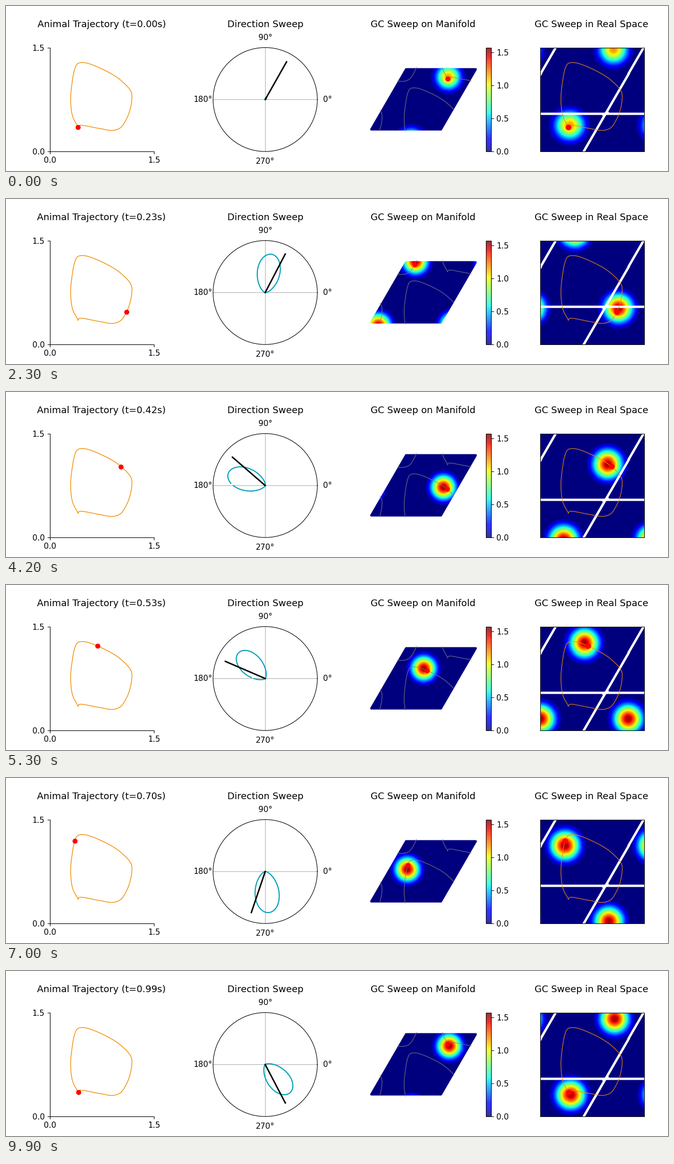
Recreate the animation shown at these times as a matplotlib script. Size 1280 px wide and 320 px high, loop 10000 ms.

```python
import numpy as np
import matplotlib.pyplot as plt
from matplotlib.animation import FuncAnimation
from matplotlib.cm import ScalarMappable
from matplotlib.colors import Normalize

W, H, DPI = 1280, 320, 100
FRAMES, INTERVAL = 100, 100
SIDE, ROOM = 201.6, 1.5            # panel side in px, arena side in m
TOP = 80.6
BASE = TOP + SIDE
TRAJ_X, POLAR_X, REAL_X = 84.6, 400.4, 1032.6
MID = complex(807.3, 181)          # centre of the manifold in px
RATIO = 5                          # phase units per metre
REAL_SCALE = SIDE / ROOM / RATIO
MAN_SCALE = 22.82
CELL_EDGE = np.pi * 15 / 16
EDGE_R = 2.3
VMAX = 1.575
THETA_HZ = 8
ORANGE, CYAN = "#F18D00", "#009FB9"
SKEW = np.exp(1j * np.pi / 3)
THETA = np.linspace(-np.pi, np.pi, 100, endpoint=False)

# Key points of the run: time in s, then stage px
KEYS = np.array([
    (0, 139.2, 235), (.02, 141.2, 232), (.10, 178, 237), (.16, 209, 241),
    (.19, 221.5, 236), (.23, 233, 219), (.31, 243.3, 181), (.35, 242.3, 167.5),
    (.42, 222.5, 144.5), (.53, 176.5, 118), (.60, 151.5, 109.9),
    (.66, 137.5, 112.7), (.70, 133, 122), (.77, 127.9, 148),
    (.84, 125, 179), (.92, 128.7, 213.5), (.99, 139.6, 235),
])
KEY_T = KEYS[:, 0]
KEY_Z = ((KEYS[:, 1] - TRAJ_X) + 1j * (BASE - KEYS[:, 2])) * ROOM / SIDE
KEY_V = np.gradient(KEY_Z, KEY_T)


def position(t):
    """Cubic Hermite path in metres, as complex numbers."""
    t = np.clip(t, 0, KEY_T[-1])
    i = np.clip(np.searchsorted(KEY_T, t, side="right") - 1, 0, len(KEY_T) - 2)
    h = KEY_T[i + 1] - KEY_T[i]
    u = (t - KEY_T[i]) / h
    return ((1 + 2 * u) * (1 - u) ** 2 * KEY_Z[i] + u * (1 - u) ** 2 * h * KEY_V[i]
            + u * u * (3 - 2 * u) * KEY_Z[i + 1] + u * u * (u - 1) * h * KEY_V[i + 1])


def heading(t):
    return np.angle(position(t + .004) - position(t - .004))


def wrap_angle(a):
    return (a + np.pi) % (2 * np.pi) - np.pi


def phases(z):
    p2 = z.imag / SKEW.imag
    return z.real - p2 / 2, p2


def wrap(z):
    """Fold a point of the plane into the rhombic unit tile."""
    p1, p2 = phases(z)
    return wrap_angle(p1) + wrap_angle(p2) * SKEW


def tile_alpha(z, scale):
    """Coverage of the rounded tile at points z."""
    p1, p2 = phases(z)
    corners = [CELL_EDGE * (a + b * SKEW) for a, b in ((-1, -1), (1, -1), (1, 1), (-1, 1))]
    dist = np.full(z.shape, np.inf)
    for a, b in zip(corners, corners[1:] + corners[:1]):
        edge = b - a
        u = np.clip(((z - a) * np.conj(edge)).real / abs(edge) ** 2, 0, 1)
        dist = np.minimum(dist, abs(z - a - u * edge))
    dist[np.maximum(abs(p1), abs(p2)) <= CELL_EDGE] = 0
    return np.clip(EDGE_R + .5 - dist * scale, 0, 1)


def bump(z, centre):
    """Activity around centre and its lattice copies, cut to zero far out."""
    total = np.zeros(z.shape)
    for a in (-1, 0, 1):
        for b in (-1, 0, 1):
            d = z - (centre + 2 * np.pi * (a + b * SKEW))
            total += np.exp(-(d.real ** 2 + d.imag ** 2) / (2 * .72 ** 2))
    return np.clip(1.1 * total - .1, 0, None)


def sweep(t):
    """Head direction, sweep direction, its strength in px, and bump centre."""
    cycle, phase = divmod(t * THETA_HZ, 1)
    rise = np.sin(np.pi * phase)
    sign = 1 if cycle % 2 else -1   # sides alternate from cycle to cycle
    head = heading(t)
    side = sign * np.radians(24) * rise ** .4
    strength = (75 + 5 * np.cos(2 * np.pi * (phase - .6))) * (1 - .94 * np.exp(-t / .01))
    reach = 9.5 * rise ** .3 + 4 * np.exp(-t / .02)
    centre = RATIO * position(t) + reach / REAL_SCALE * np.exp(1j * (head + .6 * side))
    return head, head + side, strength, centre


def pixel_grid(x0, x1, y0, y1):
    x, y = np.meshgrid(np.arange(x0, x1) + .5, np.arange(y0, y1) + .5)
    return x + 1j * y


plt.rcParams.update({"font.family": "DejaVu Sans", "xtick.labelsize": 11,
                     "ytick.labelsize": 11})
fig = plt.figure(figsize=(W / DPI, H / DPI), dpi=DPI, facecolor="white")


def add_panel(x, y, w, h, **kw):
    return fig.add_axes([x / W, 1 - (y + h) / H, w / W, h / H], **kw)


def add_title(x, text):
    return fig.text(x / W, 1 - 41 / H, text, fontsize=13, ha="center", va="baseline")


def add_dot(ax, size):
    return ax.plot([], [], "ro", markersize=size, zorder=5, clip_on=False)[0]


def add_image(ax, x0, x1, y0, y1):
    return ax.imshow(np.ones((y1 - y0, x1 - x0, 4)), extent=(x0, x1, y1, y0),
                     interpolation="nearest", aspect="auto")


def to_real(pos):
    return complex(REAL_X, BASE) + np.conj(pos) * SIDE / ROOM


def to_manifold(pos):
    return MID + MAN_SCALE * np.conj(wrap(RATIO * pos))


path = position(np.linspace(0, KEY_T[-1], 700))

# Trajectory
traj_ax = add_panel(TRAJ_X, TOP, SIDE, SIDE)
traj_ax.set(xlim=(0, ROOM), ylim=(0, ROOM), xticks=[0, ROOM], yticks=[0, ROOM])
traj_ax.spines[["top", "right"]].set_visible(False)
traj_ax.plot(path.real, path.imag, color=ORANGE, lw=1)
traj_dot = add_dot(traj_ax, 6)
traj_title = add_title(184.8, "")

# Direction
polar_ax = add_panel(POLAR_X, TOP, SIDE, SIDE, projection="polar")
polar_ax.set_ylim(0, 1.2)
polar_ax.set_xticks(np.arange(4) * np.pi / 2)
polar_ax.set_yticks([])
bump_line, = polar_ax.plot([], [], color=CYAN, lw=1.5)
head_line, = polar_ax.plot([], [], color="black", lw=2)
add_title(501.2, "Direction Sweep")

# Manifold
man_box = (700, 915, 116, 247)
x0, x1, y0, y1 = man_box
man_ax = add_panel(x0, y0, x1 - x0, y1 - y0)
man_z = np.conj(pixel_grid(*man_box) - MID) / MAN_SCALE
man_alpha = tile_alpha(man_z, MAN_SCALE)
man_img = add_image(man_ax, *man_box)
man_ax.set(xlim=(x0, x1), ylim=(y1, y0))
man_ax.axis("off")
man_path = to_manifold(path)
man_path[1:][abs(np.diff(man_path)) > MAN_SCALE] = np.nan
man_ax.plot(man_path.real, man_path.imag, color="gray", lw=1, alpha=.7)
man_dot = add_dot(man_ax, 6)
add_title(806.2, "GC Sweep on Manifold")

bar_ax = add_panel(927.6, TOP, 10.6, SIDE)
fig.colorbar(ScalarMappable(Normalize(0, VMAX), "jet"), cax=bar_ax, alpha=.8,
             ticks=[0, .5, 1, 1.5])

# Real space
real_box = (1032, 1235, 80, 283)
real_ax = add_panel(REAL_X, TOP, SIDE, SIDE)
plane = np.conj(pixel_grid(*real_box) - complex(REAL_X, BASE)) / REAL_SCALE
real_z = wrap(plane)
real_alpha = tile_alpha(wrap(plane + 1 / REAL_SCALE), REAL_SCALE)
real_img = add_image(real_ax, *real_box)
real_ax.set(xlim=(REAL_X, REAL_X + SIDE), ylim=(BASE, TOP), xticks=[], yticks=[])
real_path = to_real(path)
real_ax.plot(real_path.real, real_path.imag, color=ORANGE, lw=1, alpha=.8)
real_dot = add_dot(real_ax, 7)
add_title(1132.2, "GC Sweep in Real Space")


def paint(image, z, alpha, centre, peak):
    rgba = plt.cm.jet(peak * bump(z, centre) / VMAX)
    rgba[..., 3] = alpha
    image.set_data(rgba)


def place(dot, z):
    dot.set_data([z.real], [z.imag])


def update(frame):
    t = frame / FRAMES
    pos = position(t)
    head, aim, strength, centre = sweep(t)

    traj_title.set_text(f"Animal Trajectory (t={t:.2f}s)")
    place(traj_dot, pos)
    place(man_dot, to_manifold(pos))
    place(real_dot, to_real(pos))

    r = strength / 84 * np.exp(-2 * wrap_angle(THETA - aim) ** 2)
    bump_line.set_data(THETA, r)
    head_line.set_data([head, head], [0, 1])

    peak = 1.53 * (1 - .22 * np.exp(-t / .012))
    centre = wrap(centre)
    paint(man_img, man_z, man_alpha, centre, peak)
    paint(real_img, real_z, real_alpha, centre, peak)
    return []


anim = FuncAnimation(fig, update, frames=FRAMES, interval=INTERVAL,
                     init_func=lambda: update(0), repeat=True, repeat_delay=0)
plt.show()
```
